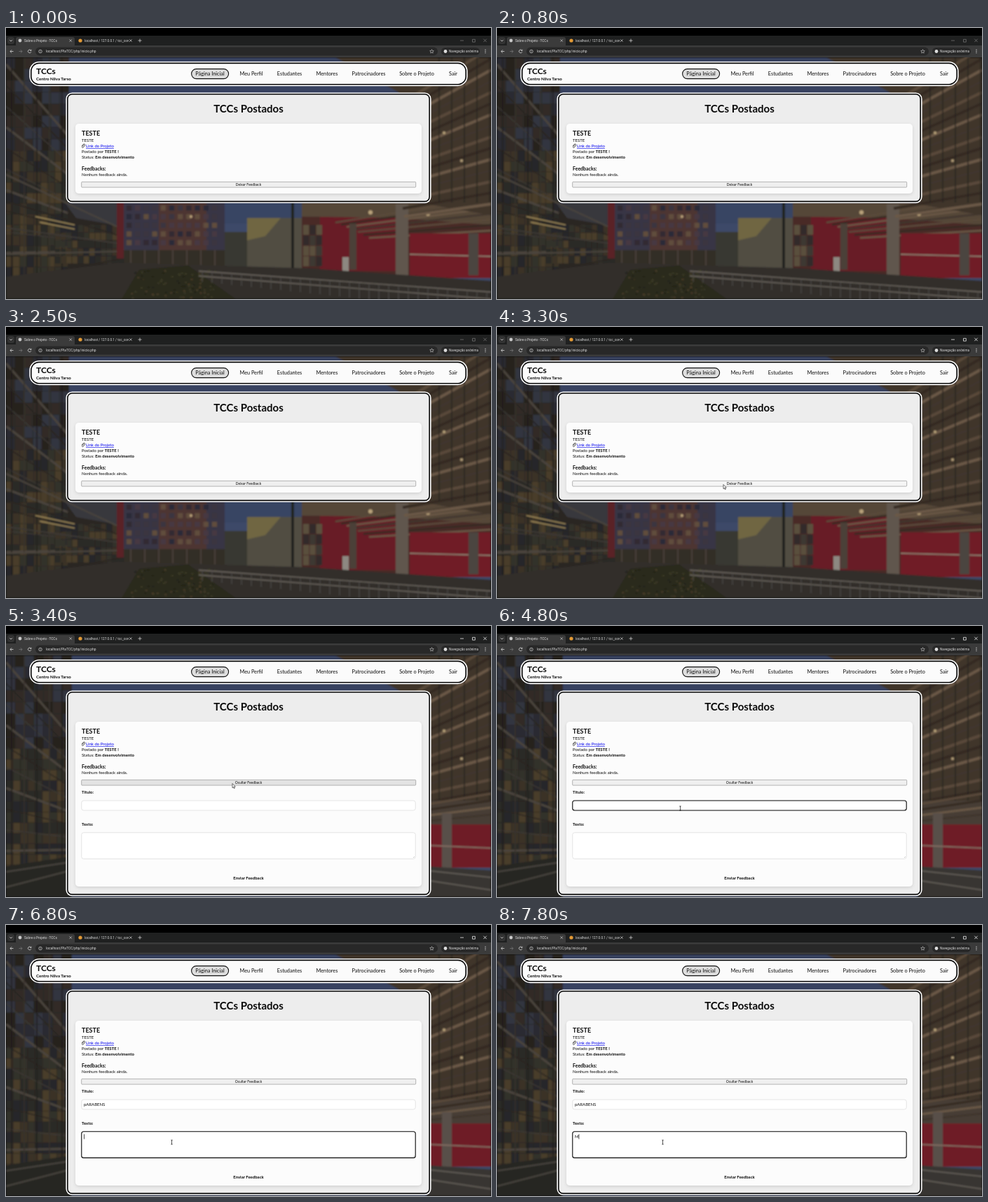
An HTML page for the animation above (8 s loop, 692x388 px).

```html
<!DOCTYPE html>
<html lang="pt-BR">
<head>
<meta charset="utf-8">
<title>TCCs</title>
<style>
  html, body { margin: 0; width: 100%; height: 100%; overflow: hidden; background: #000; }
  svg { display: block; width: 100%; height: 100%; }
  text { font-family: Lato, "Open Sans", sans-serif; fill: #0b0b0b; white-space: pre; }
  .b { font-weight: 700; }
  .ui { font-family: Roboto, sans-serif; fill: #dedede; }
</style>
</head>
<body>
<svg id="stage" viewBox="0 0 692 388" preserveAspectRatio="none"></svg>
<script>
const stage = document.getElementById('stage');

// Markup helpers
const rect = (x, y, w, h, fill, r = 0, extra = '') =>
  `<rect x="${x}" y="${y}" width="${w}" height="${h}" rx="${r}" fill="${fill}" ${extra}/>`;
const poly = (points, fill) => `<polygon points="${points}" fill="${fill}"/>`;
const line = (d, color, w = 1) => `<path d="${d}" fill="none" stroke="${color}" stroke-width="${w}"/>`;
const text = (x, y, size, str, cls = '', extra = '') =>
  `<text x="${x}" y="${y}" font-size="${size}" class="${cls}" ${extra}>${str}</text>`;
const middle = 'text-anchor="middle"';
const times = (n, fn) => Array.from({ length: n }, (_, i) => fn(i)).join('');

let seed = 7;
const random = () => (seed = seed * 16807 % 2147483647) / 2147483647;
const pick = list => list[Math.floor(random() * list.length)];
const panes = (x, y, w, h, cols, rows, colors, gap = 1) =>
  times(cols * rows, i => rect(
    x + i % cols * w / cols, y + Math.floor(i / cols) * h / rows,
    w / cols - gap, h / rows - gap, pick(colors)));

// Perspective lines run towards one vanishing point
const vanish = [230, 318];
const ray = (x1, y1, x2, color, w) => {
  const y2 = y1 + (vanish[1] - y1) * (x2 - x1) / (vanish[0] - x1);
  return line(`M${x1} ${y1}L${x2} ${y2}`, color, w);
};
const lamp = (x, y, r = 3) => `<circle cx="${x}" cy="${y}" r="${r}" fill="#dcc391" opacity=".75"/>`;
const hall = ['#2b2925', '#3a3328', '#25262a', '#33302b', '#4a3d29'];
const steel = ['#4b453d', '#2a2622', '#3c3935'];
const timber = ['#5a4a3a', '#352b24', '#6b5946', '#41362d'];

const glassHall = (right, bottom) =>
  rect(0, 42, right, bottom - 42, '#2a2723') +
  panes(0, 42, right, 134, 7, 8, ['#292b30', '#302c28', '#303541', '#25231f'], .8) +
  panes(0, 176, right, bottom - 176, 9, 14, hall, .8) +
  times(10, i => ray(0, 52 + i * 30, right, steel[i % 3], i % 3 ? 1.6 : 3)) +
  times(5, i => line(`M${8 + i * 18} 42V${bottom}`, i % 2 ? '#38332d' : '#211f1d', 1.6));

const timberRoof = left =>
  poly(`470,42 692,42 692,268 ${left},252 560,92`, '#3f352c') +
  times(15, i => ray(692, 28 + i * 16, left - 60 + i * 2, timber[i % 4], 4)) +
  times(5, i => line(`M${618 + i * 18} 42V250`, '#2a2521', 1.5)) +
  lamp(650, 190, 2) + lamp(625, 150, 2);

const widePhoto = () =>
  rect(0, 42, 692, 346, 'url(#sky)') + glassHall(90, 388) +
  // lower hall and overhang
  rect(88, 250, 82, 138, '#292624') + panes(70, 282, 98, 56, 12, 5, hall, .8) +
  poly('84,250 166,250 166,284 100,272', '#38393e') +
  times(5, i => ray(0, 210 + i * 38, 165, steel[i % 3], 2)) +
  line('M42 270L98 282M48 278L98 288', '#a18c5c', 1.5) +
  rect(158, 250, 10, 80, '#5a2425') +
  // distant blocks
  rect(168, 250, 144, 92, '#373444') + rect(218, 250, 68, 78, '#4d3533') +
  panes(172, 254, 134, 62, 11, 5, ['#292a38', '#302a30', '#3b3540', '#473942', '#604d3d'], 5) +
  rect(168, 318, 176, 26, '#302d28') +
  times(8, i => line(`M${178 + i * 20} 318v24`, '#484138', 2)) + lamp(264, 270, 2) +
  rect(312, 250, 110, 30, '#394464') +
  // concrete block
  rect(344, 272, 78, 72, '#514d43') + poly('344,272 392,272 370,298 344,304', '#706642') +
  rect(312, 292, 32, 50, '#393833') + line('M409 250V348', '#24221f', 4) +
  // red wall
  rect(422, 250, 270, 108, '#482b28') + rect(448, 260, 108, 88, '#671e27') +
  poly('422,250 692,250 692,282 560,272 422,270', '#554638') +
  times(7, i => ray(692, 242 + i * 8, 470 + i * 8, timber[i % 4], 2.5)) +
  panes(424, 282, 28, 60, 3, 4, ['#3c3830', '#5a503c', '#302c29']) +
  rect(490, 280, 10, 66, '#4b4038') + rect(480, 328, 9, 22, '#8d8881') +
  rect(576, 294, 116, 64, '#701a26') + rect(556, 252, 18, 106, '#60574e') +
  line('M576 324L692 327', '#88786a', 2) + rect(660, 294, 14, 60, '#4b4441') + lamp(520, 264) + lamp(602, 266) +
  // courtyard
  poly('0,356 160,336 430,344 692,362 692,388 0,388', '#302d2a') +
  poly('190,346 260,340 328,388 165,388', '#2b2b1f') +
  times(90, () => rect(178 + random() * 120, 346 + random() * 40, 3, 2, pick(['#3c3b25', '#202116', '#4a3c28']))) +
  line('M275 348L692 378M275 355L692 388', '#716b63', 1.3) +
  times(30, i => line(`M${280 + i * 14} ${348.5 + i}v${15 + i * .5}`, '#57524b', 1));

const closePhoto = () =>
  rect(0, 42, 692, 346, 'url(#sky)') + glassHall(94, 388) +
  poly('0,344 92,330 92,388 0,388', '#282624') +
  line('M0 352L92 338M0 374L92 350', '#494540', 2) +
  timberRoof(600) +
  rect(600, 250, 92, 36, '#463c34') +
  times(4, i => ray(692, 240 + i * 10, 600, timber[i], 3)) +
  rect(600, 284, 92, 62, '#6e1b27') + rect(622, 268, 14, 80, '#59504a') +
  line('M600 314L692 318', '#816c61', 2) +
  poly('600,344 692,350 692,388 600,388', '#373431') +
  line('M600 350L692 360M600 364L692 378', '#69645d', 1.3);

const photo = markup => `<g clip-path="url(#page)"><g filter="url(#soft)">${markup}</g></g>`;

const framed = (x, y, w, h, r, fill) =>
  rect(x, y, w, h, '#fff', r) + rect(x + 1.6, y + 1.6, w - 3.2, h - 3.2, '#050505', r - 1.6) +
  rect(x + 3.2, y + 3.2, w - 6.4, h - 6.4, fill, r - 3.2);
const card = h => rect(99, 137, 494, h, '#fcfcfc', 5, 'filter="url(#shadow)"');

const browser =
  rect(0, 0, 692, 11, '#000') + rect(0, 11, 692, 15, '#1f2020') + rect(0, 25, 692, 17, '#3b3b3b') +
  rect(2, 13, 10, 10, '#333', 3) + line('M5.3 17.2l1.8 1.8l1.8-1.8', '#ddd', .8) +
  rect(14, 13, 84, 14, '#3b3b3b', 3) +
  '<circle cx="20" cy="18" r="2.4" fill="#c8c8c8"/><circle cx="106" cy="18" r="2.6" fill="#e39a35"/>' +
  text(26, 20, 4.7, 'Sobre o Projeto - TCCs', 'ui') +
  line('M90.5 16.3l3.4 3.4m0-3.4l-3.4 3.4M176.3 16.3l3.4 3.4m0-3.4l-3.4 3.4', '#ccc', .7) +
  text(112, 20, 4.7, 'localhost / 127.0.0.1 / tcc_con', 'ui') +
  line('M188.5 18h5m-2.5-2.5v5', '#ccc', .8) +
  '<g id="controls">' + line('M648 18h5M681.3 15.7l4.4 4.4m0-4.4l-4.4 4.4', 'currentColor', .8) +
  line('M665.5 16.3h3.8v3.8h-3.8z', 'currentColor', .8) + '</g>' +
  rect(42, 27.5, 574, 12, '#282828', 6) +
  line('M10.5 33.5H6m2.1-2.2l-2.2 2.2l2.2 2.2', '#d8d8d8', .8) +
  line('M18.5 33.5H23m-2.1-2.2l2.2 2.2l-2.2 2.2', '#777', .8) +
  line('M35.6 32a2.3 2.3 0 1 0 .3 2.2M36 30.8v1.7h-1.7', '#d8d8d8', .8) +
  '<circle cx="49" cy="33.5" r="2.3" fill="none" stroke="#ccc" stroke-width=".7"/>' +
  line('M49 33.2v1.4M49 32v.6', '#ccc', .7) +
  text(57, 35.3, 4.9, 'localhost/PlaTCC/php/inicio.php', 'ui') +
  line('M607.5 30.7l.8 1.8l2 .2l-1.5 1.3l.4 2l-1.7-1l-1.7 1l.4-2l-1.5-1.3l2-.2z', '#ccc', .6) +
  rect(621, 28, 55, 11, '#282828', 5.5) + '<circle cx="627" cy="33.5" r="2.4" fill="#ddd"/>' +
  text(632, 35.3, 4.6, 'Navegação anônima', 'ui') +
  times(3, i => `<circle cx="684" cy="${31.2 + i * 2.2}" r=".65" fill="#ddd"/>`);

const nav = [[291, 'Página Inicial'], [350, 'Meu Perfil'], [404.5, 'Estudantes'], [458, 'Mentores'],
  [517.5, 'Patrocinadores'], [586, 'Sobre o Projeto'], [638, 'Sair']];

const header = framed(33.4, 48, 625.2, 35.2, 14, '#fbfbfb') +
  text(43, 66, 12, 'TCCs', 'b') + text(43, 75, 6.1, 'Centro Nilva Tarso', 'b') +
  rect(264.6, 58.6, 53, 14, '#dedede', 7, 'stroke="#111" stroke-width="1.1"') +
  nav.map(([x, s]) => text(x, 68, 7.3, s, '', middle)).join('');

const cardText =
  text(346, 121, 15, 'TCCs Postados', 'b', middle) +
  text(108, 154.3, 9, 'TESTE', 'b') + text(108, 163, 6, 'TESTE') +
  line('M111.4 167l-2.6 2.8a.9.9 0 0 0 1.3 1.3l2.2-2.6a1.4 1.4 0 0 0-2-2l-2.2 2.6', '#222', .8) +
  text(114, 171, 6, 'Link do Projeto', '', 'style="fill:#00e;text-decoration:underline"') +
  text(108, 178.8, 5.9, 'Postado por <tspan class="b">TESTE !</tspan>') +
  text(108, 186.8, 6, 'Status: <tspan class="b">Em desenvolvimento</tspan>') +
  text(108, 204.3, 7, 'Feedbacks:', 'b') + text(108, 212.4, 6, 'Nenhum feedback ainda.') +
  rect(107.7, 220.3, 477, 7.8, '#efefef', 1, 'id="toggle" stroke="#858585" stroke-width=".6"') +
  text(346, 226, 5, '', '', `id="label" ${middle}`);

const field = (id, y, h) =>
  rect(107.8, y, 476.4, h, '#fff', 3, `id="${id}"`) +
  text(111, y + 8.8, 6, '', '', `id="${id}Text"`);

const form = '<g id="form">' +
  text(108, 240, 6, 'Título:', 'b') + field('title', 250, 14) +
  text(108, 285.7, 6, 'Texto:', 'b') + field('body', 295.8, 37.6) +
  line('M581 332l2-2', '#999', .5) +
  text(346, 362.5, 6, 'Enviar Feedback', 'b', middle) + '</g>';

stage.innerHTML = `<defs>
  <linearGradient id="sky" x1="0" y1="0" x2="0" y2="1"><stop stop-color="#37425f"/><stop offset=".6" stop-color="#3c4868"/></linearGradient>
  <filter id="soft"><feGaussianBlur stdDeviation=".9"/></filter>
  <filter id="shadow" x="-5%" y="-10%" width="110%" height="125%"><feDropShadow dx="0" dy="1.5" stdDeviation="2" flood-opacity=".13"/></filter>
  <clipPath id="page"><rect y="42" width="692" height="346"/></clipPath>
  </defs>
  <g id="wide">${photo(timberRoof(600) && widePhoto() + timberRoof(600))}${framed(85.4, 92.4, 521.2, 158.4, 9, '#ededed')}${card(100)}</g>
  <g id="close">${photo(closePhoto())}${framed(85.4, 92.4, 521.2, 294.4, 9, '#ededed')}${card(236)}</g>
  ${browser}${header}${cardText}${form}
  ${rect(0, 0, .7, 7, '#000', 0, 'id="caret"')}
  <g id="arrow"><path d="M0 0v6.2l1.4-1.2l1 2.2l1-.5l-1-2.1h1.9z" fill="#fff" stroke="#111" stroke-width=".6"/></g>
  <g id="beam">${line('M-1.2-3h2.4M0-3v6M-1.2 3h2.4', '#111', .7)}</g>`;

const el = id => document.getElementById(id);
const ui = Object.fromEntries(['wide', 'close', 'controls', 'toggle', 'label', 'form', 'title', 'body',
  'titleText', 'bodyText', 'caret', 'arrow', 'beam'].map(id => [id, el(id)]));

// [time, x, y]
const pointerPath = [[2800, 396, 150], [3000, 352, 190], [3200, 323, 225.5], [3600, 323, 225.5],
  [3700, 302, 240], [3800, 272, 257], [3900, 261.5, 261], [6500, 261.5, 261], [6600, 248, 292],
  [6700, 236.5, 311], [8000, 236.5, 311]];
const word = 'pARABENS';
const keyTimes = [4900, 5100, 5300, 5500, 5700, 5800, 6000, 6100];
const clamp = v => Math.max(0, Math.min(1, v));
const show = (node, on) => node.setAttribute('visibility', on ? 'visible' : 'hidden');

function pointerAt(t) {
  const i = Math.max(1, pointerPath.findIndex(p => p[0] >= t));
  const [a, b] = [pointerPath[i - 1], pointerPath[i]];
  const k = clamp((t - a[0]) / (b[0] - a[0]));
  return [a[1] + (b[1] - a[1]) * k, a[2] + (b[2] - a[2]) * k];
}

function setFocus(node, amount) {
  const c = Math.round(218 - 210 * amount);
  node.setAttribute('stroke', `rgb(${c},${c},${c})`);
  node.setAttribute('stroke-width', .7 + .4 * amount);
}

function draw(now) {
  const t = Math.floor(now % 8000 / 100) * 100;
  const open = t >= 3400;
  show(ui.wide, !open);
  show(ui.close, open);
  show(ui.form, open);
  ui.controls.setAttribute('color', t < 2800 ? '#707070' : '#eee');
  ui.label.textContent = open ? 'Ocultar Feedback' : 'Deixar Feedback';
  const hover = t >= 3200 && t < 3700;
  ui.toggle.setAttribute('fill', t === 3300 ? '#f5f5f5' : hover ? '#e3e3e3' : '#efefef');

  const [x, y] = pointerAt(t);
  const overField = t >= 3800;
  for (const node of [ui.arrow, ui.beam]) node.setAttribute('transform', `translate(${x} ${y})`);
  show(ui.arrow, t >= 2800 && !overField);
  show(ui.beam, overField);

  const moved = clamp((t - 6500) / 300);
  setFocus(ui.title, clamp((t - 4000) / 300) - moved);
  setFocus(ui.body, moved);

  ui.titleText.textContent = word.slice(0, keyTimes.filter(k => k <= t).length);
  ui.bodyText.textContent = t >= 7800 ? 'M' : '';
  const inBody = t >= 6600;
  const active = inBody ? ui.bodyText : ui.titleText;
  const width = active.textContent ? active.getComputedTextLength() : 0;
  ui.caret.setAttribute('x', 111 + width);
  ui.caret.setAttribute('y', inBody ? 299.5 : 253.5);
  show(ui.caret, t >= 4300 && t < 4800 || t >= 4900 && t < 7400 || t >= 7800);
}

function tick(now) {
  draw(now);
  requestAnimationFrame(tick);
}
draw(0);
requestAnimationFrame(tick);
</script>
</body>
</html>
```
